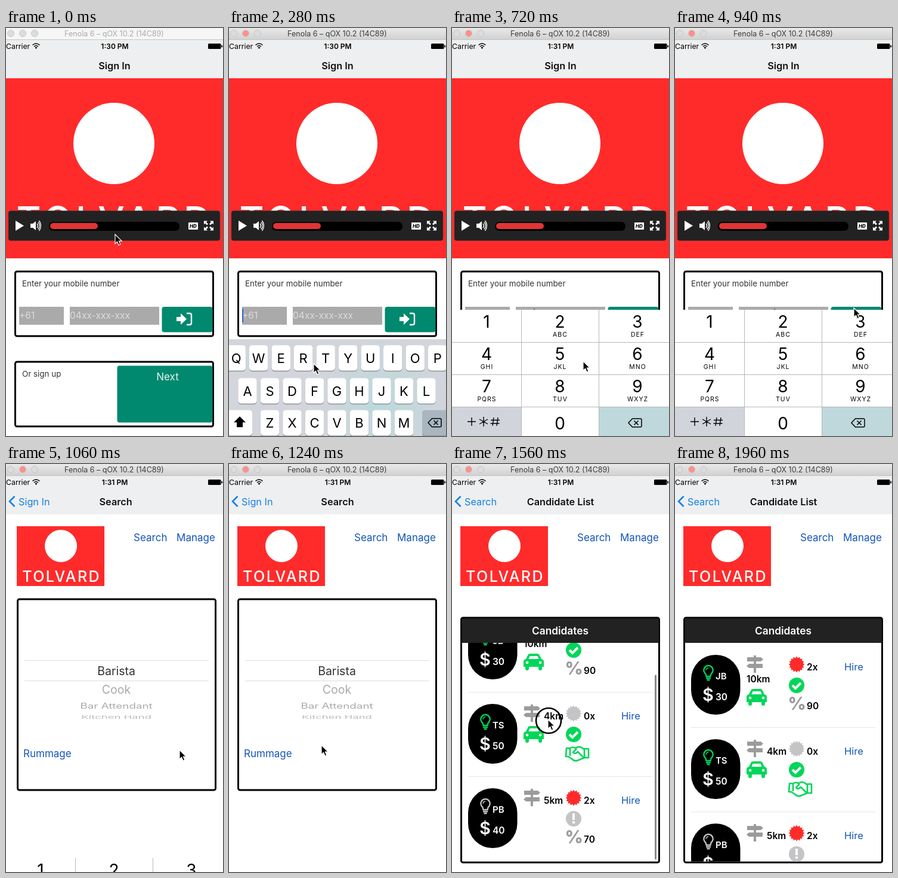
Write an HTML page that moves like this. It is 364x682 px and loops after 1980 ms.

```html
<!DOCTYPE html>
<html lang="en">
<head>
<meta charset="utf-8">
<style>
html, body { margin: 0; width: 100%; height: 100%; overflow: hidden; background: #fff }
svg { display: block; width: 364px; height: 682px; font-family: Inter, Roboto, sans-serif; white-space: pre }
</style>
</head>
<body>
<svg id="stage" viewBox="0 0 364 682" xmlns="http://www.w3.org/2000/svg"></svg>
<script>
const LOOP = 1980, STEP = 20;
const RED = '#ff2b2b', GREEN = '#00d659', GREY = '#9b9b9b', TEAL = '#00896f', LINK = '#1355b8';
const MID = 'text-anchor="middle"', BOLD = 'font-weight="600"';

const text = (x, y, size, str, attrs = '') => `<text x="${x}" y="${y}" font-size="${size}" ${attrs}>${str}</text>`;
const rect = (x, y, w, h, fill, r = 0, attrs = '') =>
  `<rect x="${x}" y="${y}" width="${w}" height="${h}" fill="${fill}" rx="${r}" ${attrs}/>`;
const path = (d, attrs) => `<path d="${d}" ${attrs}/>`;
const line = (d, color, w, attrs = '') => path(d, `fill="none" stroke="${color}" stroke-width="${w}" ${attrs}`);
const disc = (x, y, r, fill) => `<circle cx="${x}" cy="${y}" r="${r}" fill="${fill}"/>`;
const at = (x, y, body) => `<g transform="translate(${x} ${y})">${body}</g>`;
const group = (id, body) => `<g id="${id}">${body}</g>`;
const frame = (y, h) => rect(15.5, y, 332, h, '#fff', 3, 'stroke="#000" stroke-width="3"');

// Brand block, centred on its mark
const brand = disc(0, 0, 27, '#fff') + text(1, 60, 25, 'TOLVARD', `${MID} fill="#fff" font-weight="500" letter-spacing="2.4"`);
const pageTop = rect(14, 104, 147, 100, RED) + at(88, 137, brand) +
  text(210, 129, 17, 'Search', `fill="${LINK}"`) + text(282, 129, 17, 'Manage', `fill="${LINK}"`);
const sheet = rect(-17, 84, 12, 598, 'url(#shade)') + rect(-5, 84, 374, 598, '#fff');

// Sign-in page
const player = rect(4, 305.5, 355, 50, '#222', 4, 'stroke="#444" stroke-dasharray="1 1"') +
  path('M16 322L30 330.5L16 339Z', 'fill="#fff"') +
  path('M41 327h4l5-4v15l-5-4h-4z', 'fill="#fff"') +
  line('M52 327q3 3.500 0 7M54 324.500q5 6 0 12M55.500 322q6 8.500 0 17', '#fff', 1.4) +
  rect(72, 324, 219, 15, '#000', 7) + rect(74, 326, 80, 10, '#e23434', 5) +
  rect(306, 325, 16, 12, '#fff', 1) + text(314, 334, 8, 'HD', `${MID} font-weight="800" font-style="italic"`) +
  [0, 90, 180, 270].map(a => `<g transform="rotate(${a} 340 330.500)">` +
    path('M332 322.500h6l-2 2 3 3-2 2-3-3-2 2z', 'fill="#fff"') + '</g>').join('');

const signIn = rect(0, 84, 364, 598, '#fff') + rect(0, 84, 364, 301, RED) +
  `<g transform="translate(181 193) scale(2.52)">${brand}</g>` + player +
  frame(407, 108) + text(27, 432, 13.4, 'Enter your mobile number', 'fill="#333"') +
  rect(22, 466, 75, 30, '#aaa') + rect(107, 466, 150, 30, '#aaa') +
  text(22, 486, 15.6, '+61', 'fill="#dcdcdc"') + text(107, 486, 15.6, '04xx-xxx-xxx', 'fill="#dcdcdc"') +
  rect(0, 469, 2, 23, '#2f62e0', 0, 'id="caret"') +
  rect(261.5, 466, 85, 42.5, TEAL, 4) +
  path('M286 483h7v-6l10 9.500-10 9.500v-6h-7z', 'fill="#fff"') +
  line('M303 477h5q3 0 3 3v13q0 3-3 3h-5', '#fff', 2.4) +
  frame(558, 108) + text(27, 583, 13.4, 'Or sign up', 'fill="#333"') +
  rect(186.5, 564.5, 160, 95, TEAL, 4) + text(271, 589, 17, 'Next', `${MID} fill="#e8f5f2"`);

// Search page with the job wheel
const wheel = [['Barista', 353, 19.5, 1, '#333'], ['Cook', 384, 19.6, 1, '#aaa'],
  ['Bar Attendant', 409, 18.8, .68, '#aaa'], ['Kitchen Hand', 426, 18.5, .4, '#bbb']]
  .map(([job, y, size, squash, fill]) =>
    `<g transform="translate(181 ${y}) scale(1 ${squash})">${text(0, 0, size, job, `${MID} fill="${fill}"`)}</g>`).join('');
const search = sheet + pageTop + frame(226, 319) + line('M27 328.500h309M27 362.500h309', '#ddd', 1) + wheel +
  text(25, 490, 17, 'Rummage', `fill="${LINK}"`);

// Candidate icons
const burst = fill => `<polygon fill="${fill}" points="${Array.from({ length: 32 }, (_, i) => {
  const a = i * Math.PI / 16, r = i % 2 ? 10.8 : 13.4;
  return (204 + r * Math.cos(a)).toFixed(1) + ',' + (36 + r * Math.sin(a)).toFixed(1);
}).join(' ')}"/>`;
const bulb = c => line('M51.500 52q-4-4-3-8 2-6 7.500-6t7.500 6q1 4-3 8l-1 4h-7z', c, 2.3) +
  line('M52 59h8M53.500 62h5', c, 2.4) + line('M52 46q0-4 4-4', c, 1.3);
const signpost = rect(132, 21, 4, 29, GREY) +
  path('M121 24h23l4 3.500-4 3.500h-23zM147 35h-23l-4 3.500 4 3.500h23z', `fill="${GREY}"`);
const car = y => at(120, y, path('M0 13q0-3 4-4l3-6q1-3 4-3h12q3 0 4 3l3 6q4 1 4 4v9h-3v3q0 3-3 3t-3-3v-3H9v3q0 3-3 3t-3-3v-3H0z', `fill="${GREEN}"`) +
  path('M8.500 9l2-5h13l2 5z', 'fill="#fff"') + disc(6, 15, 2.3, '#fff') + disc(28, 15, 2.3, '#fff'));
const check = disc(204, 71, 13, GREEN) + line('M197 71l5 5 9-9', '#fff', 4);
const alert = disc(204, 71, 13, '#c4c4c7') + rect(202, 62, 4, 11, '#fff') + rect(202, 75, 4, 4, '#fff');
const handshake = line('M192 94h6q5-3 9 0l4-2q5-1 9 3h9v15h-7l-10 4q-6 3-11-2l-6-4h-4zM209 95l-6 6q3 4 8-1l9 9M198 94v13M222 95v14', GREEN, 2.6, 'stroke-linejoin="round"');
const percent = n => text(189.5, 112, 29.5, '%', `fill="${GREY}" font-weight="800"`) + text(221, 111, 15.5, n, BOLD);

const people = [
  { name: 'JB', pay: 30, lit: GREEN, far: text(120, 66, 15.5, '10km', BOLD) + car(77), hot: RED, times: '2x', extra: check + percent(90) },
  { name: 'TS', pay: 50, lit: GREEN, far: text(154, 46, 15.5, '4km', BOLD) + car(57), hot: '#c4c4c7', times: '0x', extra: check + handshake },
  { name: 'PB', pay: 40, lit: '#c4c4c7', far: text(154, 46, 15.5, '5km', BOLD), hot: RED, times: '2x', extra: alert + percent(70) }
];
const row = (p, i) => at(0, 299 + 141 * i,
  rect(27, 20, 82.5, 100, '#000', 41) + bulb(p.lit) +
  text(68, 61, 15, p.name, `fill="#fff" ${BOLD}`) + text(46, 97, 29, '$', `fill="#fff" ${BOLD}`) +
  text(68, 96, 15.5, p.pay, `fill="#fff" ${BOLD}`) +
  signpost + p.far + burst(p.hot) + text(221, 46, 15.5, p.times, BOLD) + p.extra +
  text(284, 46, 16.5, 'Hire', `fill="${LINK}"`) + (i < 2 ? line('M27 141.500h309', '#e6e6e6', 1) : ''));

const candidates = sheet + pageTop + frame(257, 409) +
  `<g clip-path="url(#list)">${group('rows', people.map(row).join(''))}</g>` +
  rect(340, 0, 3, 309, '#888', 1.5, 'id="bar"') +
  rect(17, 258, 330, 41, '#222') + text(181.5, 285, 17.3, 'Candidates', `${MID} fill="#fff" ${BOLD}`);

// Keyboards, drawn from their own top edge
const erase = (x, y) => at(x, y, line('M0 7.500L6.500 .5H20q2 0 2 2v10q0 2-2 2H6.500z', '#000', 1.5) +
  line('M9.500 4l7 7m0-7l-7 7', '#000', 1.5));
const key = (x, y, w, fill = '#fff') => rect(x, y + 1, w, 43, '#8c9097', 5) + rect(x, y, w, 42.5, fill, 5);
const letters = [['QWERTYUIOP', 12.2, 10], ['ASDFGHJKL', 31, 65], ['ZXCVBNM', 68.5, 118.5]].map(([chars, x0, y]) =>
  [...chars].map((c, i) => key(x0 + 37.5 * i - 15.7, y, 31.4) +
    text(x0 + 37.5 * i, y + 29.5, 22, c, MID)).join('')).join('');
const qwerty = rect(0, 0, 364, 212, '#d2d5db') + rect(150, 0, 214, 212, 'url(#tint)') + letters +
  key(-4, 118.5, 43) + path('M18 129l10 10h-5v8h-10v-8h-5z', '') +
  key(324, 118.5, 44, '#a9b6bf') + erase(334, 132) +
  key(-4, 171, 88, '#adb3bc') + text(41, 197, 15, '123', MID) +
  key(90, 171, 178) + text(179, 197, 15, 'space', MID) +
  key(274, 171, 94, '#adb3bc') + text(319, 197, 15, 'return', MID);

const columns = [58, 181, 311];
const keypad = rect(0, 0, 364, 212, '#fff') + rect(0, 162, 116, 50, '#d1d4da') + rect(247, 162, 117, 50, '#bfd8dc') +
  ',ABC,DEF,GHI,JKL,MNO,PQRS,TUV,WXYZ'.split(',').map((sub, i) => {
    const x = columns[i % 3], y = 54 * Math.floor(i / 3);
    return text(x, y + 30, 28, i + 1, MID) + text(x + .5, y + 45, 10.5, sub, `${MID} letter-spacing="1"`);
  }).join('') + text(181, 200, 28, '0', MID) +
  line('M116.500 0v211M246.500 0v211M0 54.500h364M0 108.500h364M0 162.500h364', '#b4b7bb', 1) +
  line('M26 187h14M33 180v14M53 179v16M46 183l14 8m0-8l-14 8M70 180l-2 14M77 180l-2 14M65 184.500h15M64.500 190h15', '#000', 1.4) +
  erase(296, 181.5);

// Window and navigation bars
const titles = ['Sign In', 'Search', 'Candidate List'];
const chrome = rect(0, 20, 364, 64, '#eeeff0') +
  rect(0, 0, 364, 20, '#f6f6f6', 0, 'id="titleBar"') + line('M0 19.500h364', '#c4c4c4', 1) +
  [8, 28, 48].map((x, i) => `<circle cx="${x}" cy="9" r="5.500" fill="#dcdcdc" stroke="#c6c6c6"${i === 1 ? ' id="dot"' : ''}/>`).join('') +
  text(181.5, 14, 12.5, 'Fenola 6 – qOX 10.2 (14C89)', `${MID} id="window"`) +
  text(0, 34.5, 12.3, 'Carrier') +
  line('M44.500 28.500q6-5 12 0M47 31q3.500-3 7 0', '#000', 1.6) + path('M48.500 32.500q2-1.500 4 0l-2 2.500z', '') +
  text(182.5, 34.5, 12, '', `${MID} ${BOLD} id="clock"`) +
  rect(339, 26, 21.5, 9, '#000', 1.5) + rect(361.3, 28.5, 1.7, 4, '#000', .8) +
  titles.map((s, i) => text(0, 68.5, 16.3, s, `${MID} ${BOLD} fill="#111" id="title${i}"`)).join('') +
  line('M14.500 54L6 62.500L14.500 71', '#1281e6', 2.6, 'id="chevron"') +
  [0, 1].map(i => text(21, 68.5, 16.3, titles[i], `fill="#1281e6" id="back${i + 1}"`)).join('');

const gradient = (id, a, b, extra = '') => `<linearGradient id="${id}" ${extra}><stop stop-color="${a}"/><stop offset="1" stop-color="${b}"/></linearGradient>`;
stage.innerHTML = '<defs>' +
  gradient('active', '#e9e9e9', '#d0d0d0', 'x2="0" y2="1"') +
  gradient('shade', 'rgba(0,0,0,0)', 'rgba(0,0,0,.2)') +
  '<radialGradient id="tint"><stop stop-color="#b9d9dc"/><stop offset="1" stop-color="#b9d9dc" stop-opacity="0"/></radialGradient>' +
  '<clipPath id="list"><rect x="17" y="299" width="330" height="365.500"/></clipPath></defs>' +
  group('page0', signIn) + group('page1', search) + group('page2', candidates) + chrome +
  group('letterKeys', qwerty) + group('digitKeys', keypad) +
  group('pointer', '<circle id="touch" cx="1" cy="2" r="21" fill="none" stroke="#000" stroke-width="2.600"/>' +
    path('M0 0V15.500L3.600 12.200L6 18L8.800 16.800L6.400 11.200H11.200Z', 'stroke="#fff" stroke-width="1.200"'));

// Pointer stops: time, x, y
const stops = [[0, 183, 345], [120, 150, 430], [180, 35, 478], [220, 35, 478], [280, 142, 561], [380, 150, 520],
  [420, 180, 469], [480, 181, 655], [520, 181, 655], [580, 58, 545], [640, 58, 545], [720, 220, 557],
  [800, 311, 490], [860, 181, 600], [920, 300, 468], [980, 300, 468], [1060, 291, 478], [1180, 240, 460],
  [1300, 70, 480], [1370, 70, 480], [1400, 141, 442], [1460, 163, 486], [1500, 163, 486], [1560, 161, 427],
  [1640, 161, 427], [1740, 165, 486], [1900, 330, 13]];

const $ = id => document.getElementById(id);
const move = (id, x, y) => $(id).setAttribute('transform', `translate(${x} ${y})`);
const fade = (id, v) => $(id).setAttribute('opacity', v);
const show = (id, on) => $(id).setAttribute('display', on ? 'inline' : 'none');
const ramp = (t, start, length) => Math.min(1, Math.max(0, (t - start) / length));
// Part of an eased move still to go, 1 to 0
const rest = (t, start, length, power = 3) => (1 - ramp(t, start, length)) ** power;

function draw(t) {
  const on = t >= 160;
  $('titleBar').setAttribute('fill', on ? 'url(#active)' : '#f6f6f6');
  $('window').setAttribute('fill', on ? '#3c3c3c' : '#aaa');
  $('dot').setAttribute('fill', on ? '#ff8f8a' : '#dcdcdc');
  $('clock').textContent = t < 540 ? '1:30 PM' : '1:31 PM';

  // Each page enters with its own push and leaves with the next one
  const push = [0, rest(t, 980, 103), rest(t, 1370, 102), 1];
  for (let i = 0; i < 3; i++) {
    const enter = push[i], leave = push[i + 1], seen = (1 - enter) * leave;
    show('page' + i, enter < 1 && leave > 0);
    move('page' + i, 364 * enter - 9 * (1 - leave), 0);
    fade('page' + i, 1 - .75 * (1 - leave));
    $('title' + i).setAttribute('x', 182 + 193 * enter - 134 * (1 - leave ** 4));
    fade('title' + i, seen);
    if (i) fade('back' + i, seen);
  }
  fade('chevron', (1 - push[1]) * Math.max(push[2], 1 - push[2]));

  const digits = Math.min(10, Math.max(0, Math.floor((t - 430) / 70) - 1));
  show('caret', t >= 200);
  $('caret').setAttribute('x', t < 420 ? 22 : 108 + 9.7 * digits);
  show('letterKeys', t > 255 && t < 420);
  move('letterKeys', 0, 472 + 210 * rest(t, 255, 48, 2));
  show('digitKeys', t >= 420 && t < 1075);
  move('digitKeys', 0, 471 + 211 * (1 - rest(t, 1030, 45, 2)));

  const scroll = 59 * (ramp(t, 1500, 58) - ramp(t, 1650, 90));
  move('rows', 0, -scroll);
  show('bar', t > 1500 && t < 1800);
  $('bar').setAttribute('y', 302 + scroll * .85);

  const n = stops.findIndex(s => s[0] > t);
  show('pointer', n > 0);
  if (n > 0) {
    const [a, b] = [stops[n - 1], stops[n]], u = ramp(t, a[0], b[0] - a[0]);
    move('pointer', a[1] + (b[1] - a[1]) * u, a[2] + (b[2] - a[2]) * u);
  }
  show('touch', t >= 1500 && t < 1740);
}

function play() {
  draw(Math.floor((performance.now() + 1) / STEP) * STEP % LOOP);
  requestAnimationFrame(play);
}
play();
</script>
</body>
</html>
```
